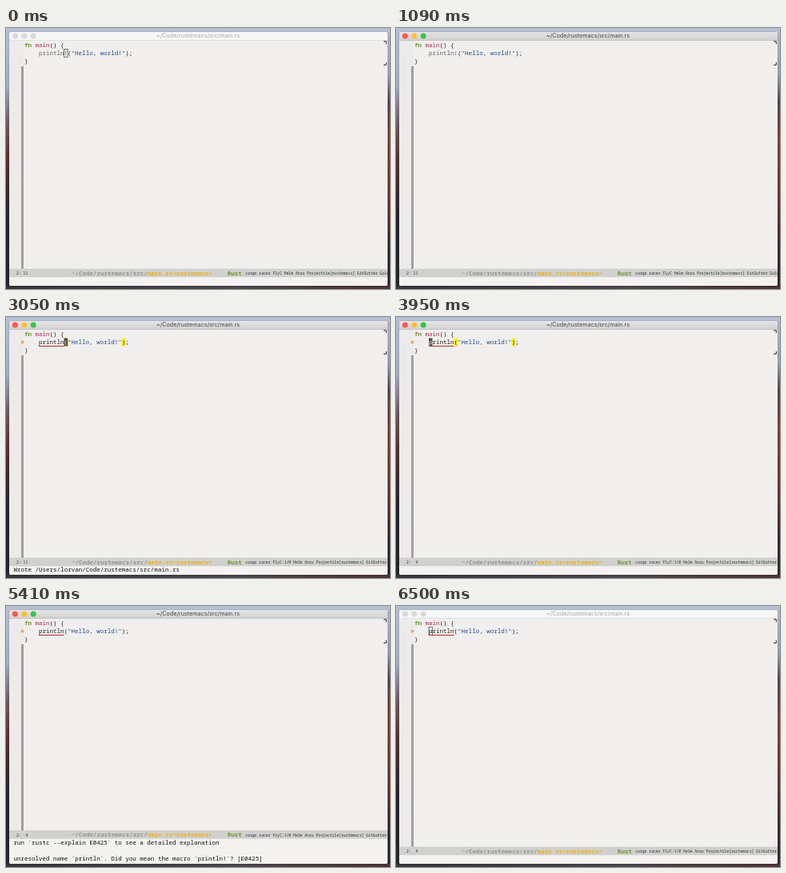
Write an HTML page that moves like this. It is 480 px wide and 327 px high and loops after 6550 ms.

```html
<!DOCTYPE html>
<html lang="en">
<head>
<meta charset="utf-8">
<title>Editor session</title>
<style>
  html, body { margin: 0; width: 100%; height: 100%; overflow: hidden; background: #2c2b38; }
  svg { display: block; width: 480px; height: 327px; }
  text { white-space: pre; font: 500 7.52px "Noto Sans Mono", "DejaVu Sans Mono", monospace; fill: #222; }
  .bold { font-weight: 700; }
  .small { font-size: 4.75px; fill: #2c2c2c; }
  .title { font: 7.2px Inter, "Open Sans", sans-serif; text-anchor: middle; }
  .key { font-weight: 700; fill: #6f962b; }
  .fn { fill: #a52a58; }
  .macro { fill: #666; }
  .str { fill: #234b8c; }
  .path { fill: #929292; }
  .file { fill: #e8b020; }
  .echo { fill: #111; }
</style>
</head>
<body>
<svg viewBox="0 0 480 327">
  <defs>
    <linearGradient id="sky" x2="0" y2="1">
      <stop offset="0" stop-color="#b4bfd3"/>
      <stop offset=".22" stop-color="#a3acc0"/>
      <stop offset=".36" stop-color="#6f5a64"/>
      <stop offset=".5" stop-color="#59302f"/>
      <stop offset=".72" stop-color="#23252f"/>
      <stop offset="1" stop-color="#25272d"/>
    </linearGradient>
    <linearGradient id="cliff" x2="0" y2="1">
      <stop offset="0" stop-color="#afbad0"/>
      <stop offset=".18" stop-color="#959fb3"/>
      <stop offset=".28" stop-color="#58474c"/>
      <stop offset=".42" stop-color="#8f3e33"/>
      <stop offset=".68" stop-color="#743029"/>
      <stop offset=".84" stop-color="#3a2a30"/>
      <stop offset="1" stop-color="#33282c"/>
    </linearGradient>
    <linearGradient id="ground">
      <stop offset="0" stop-color="#34373c"/>
      <stop offset=".6" stop-color="#4b474c"/>
      <stop offset="1" stop-color="#4a3434"/>
    </linearGradient>
    <linearGradient id="bar" x2="0" y2="1">
      <stop offset="0" stop-color="#e6e5e6"/>
      <stop offset="1" stop-color="#d1d0d1"/>
    </linearGradient>
    <clipPath id="frame"><rect x="4" y="5" width="473" height="318" rx="2.5"/></clipPath>
  </defs>

  <rect width="240" height="327" fill="url(#sky)"/>
  <rect x="240" width="240" height="327" fill="url(#cliff)"/>
  <rect width="480" height="5" fill="#b6c0d3"/>
  <rect y="323" width="480" height="4" fill="url(#ground)"/>
  <rect x="3.4" y="4.6" width="474.2" height="319.4" rx="3" fill="#000" opacity=".15"/>

  <g clip-path="url(#frame)">
    <rect x="4" y="5" width="473" height="318" fill="#f0efed"/>
    <rect x="4" y="15" width="18" height="308" fill="#ecebe9"/>
    <rect id="bar-fill" x="4" y="5" width="473" height="10.5"/>
    <rect id="bar-edge" x="4" y="15" width="473" height=".6"/>
    <circle class="light" cx="11.4" cy="9.9" r="3.5"/>
    <circle class="light" cx="22.8" cy="9.9" r="3.5"/>
    <circle class="light" cx="34.2" cy="9.9" r="3.5"/>
    <circle id="edited" cx="11.4" cy="9.9" r="1.2" fill="#7a1512"/>
    <text id="title" class="title" x="240" y="12.4">~/Code/rustemacs/src/main.rs</text>

    <g fill="none" stroke-width="3">
      <path d="M20.5 48V303" stroke="#b4b4b2"/>
      <path d="M20.5 48V303" stroke="#8c8c8a" stroke-dasharray="1.1 .9"/>
    </g>
    <path d="M472 16.8H475.3V20M475.3 43V46.3H472" fill="none" stroke="#222" stroke-width="1"/>

    <g id="parens" fill="#fbf21b">
      <rect x="72.6" y="26.5" width="5" height="10"/>
      <rect x="144.6" y="26.5" width="5" height="10"/>
    </g>
    <rect id="cursor" y="26.5" width="4.5" height="10"/>
    <text x="23" y="23.9"><tspan class="key">fn</tspan> <tspan class="fn">main</tspan>() {</text>
    <text id="macro-line" x="41" y="34.2"><tspan class="macro">println!</tspan>(<tspan class="str">"Hello, world!"</tspan>);</text>
    <text id="call-line" x="41" y="34.2"><tspan id="first">p</tspan>rintln<tspan id="open">(</tspan><tspan class="str">"Hello, world!"</tspan>);</text>
    <text x="23" y="44.3">}</text>
    <g id="error">
      <path d="M41 36.5H72.5" stroke="#b5282c" stroke-width="1"/>
      <text class="bold" x="17.9" y="34.2" style="fill:#e3932d;font-size:8.6px">»</text>
    </g>

    <g id="mode">
      <rect x="4" y="312" width="473" height="40" fill="#f3f2f0"/>
      <rect id="mode-bg" x="4" width="473" fill="#d0d0cf"/>
      <text id="pos" class="small" x="13" y="309.3"></text>
      <g id="flag">
        <rect x="37" y="299.7" width="19" height="11.6" fill="#fbfafa" stroke="#b8282e" stroke-width="1.2"/>
        <text class="bold" x="41.2" y="309.8" style="fill:#c0272d">**</text>
      </g>
      <g id="mode-text">
        <text class="bold" x="82" y="309.6"><tspan class="path">~/Code/rustemacs/src/</tspan><tspan class="file">main.rs&lt;rustemacs&gt;</tspan></text>
        <text class="key" x="276.7" y="309.6">Rust</text>
        <text id="minor" class="small" x="299.2" y="309.3"></text>
      </g>
    </g>
    <text id="echo-top" class="echo" x="9.5" y="298.8"></text>
    <text id="echo" class="echo" x="9.5" y="319"></text>
  </g>
</svg>
<script>
const LOOP = 6550;
const FOCUS = 560, ERASE = 1610, SAVE = 2590, CHECKED = 2900,
      MOVE = 3860, EXPLAIN = 4770, BLUR = 6200;
const PAREN_DELAY = 125, BLINK = 500;
const START_X = 41, CALL_END = 72.6;

const $ = id => document.getElementById(id);
const lights = [...document.querySelectorAll('.light')];
const show = (id, on) => $(id).setAttribute('visibility', on ? 'visible' : 'hidden');
const attrs = (el, map) => Object.entries(map).forEach(([k, v]) => el.setAttribute(k, v));
const write = (id, text) => { if ($(id).textContent !== text) $(id).textContent = text; };
const within = (t, from, to) => t >= from && t < to;

// The cursor blinks from the most recent key press or focus change.
function cursorOn(t) {
  const last = [MOVE, SAVE, ERASE, FOCUS].find(k => t >= k);
  return Math.floor((t - last) / BLINK) % 2 === 0;
}

function drawWindow(active) {
  attrs($('bar-fill'), { fill: active ? 'url(#bar)' : '#f6f6f6' });
  attrs($('bar-edge'), { fill: active ? '#b5b4b5' : '#d6d6d6' });
  $('title').style.fill = active ? '#444' : '#aaa';
  const colors = active ? ['#fc5652', '#fdbc38', '#33c748'] : ['#d9d9d9', '#d9d9d9', '#d9d9d9'];
  lights.forEach((el, i) => attrs(el, { fill: colors[i] }));
}

function drawCode(t, active) {
  const erased = t >= ERASE, moved = t >= MOVE;
  const solid = active && cursorOn(t);
  show('macro-line', !erased);
  show('call-line', erased);
  show('error', t >= CHECKED);
  show('parens', within(t, ERASE + PAREN_DELAY, MOVE + PAREN_DELAY));
  show('cursor', solid || !active);
  attrs($('cursor'), {
    x: moved ? START_X : CALL_END,
    fill: solid ? '#4a4a48' : 'none',
    stroke: active ? 'none' : '#555',
    'stroke-width': .8
  });
  $('first').style.fill = solid && moved ? '#f0efed' : '';
  $('open').style.fill = solid && erased && !moved ? '#f3eb3a' : '';
}

function drawModeLine(t) {
  const dirty = within(t, ERASE, SAVE);
  const tall = within(t, EXPLAIN, BLUR);
  const check = t < SAVE ? 'FlyC' : t < CHECKED ? 'FlyC*' : 'FlyC:1/0';
  show('flag', dirty);
  show('edited', dirty);
  attrs($('mode-bg'), { y: dirty ? 299 : 301.6, height: dirty ? 13 : 10.6 });
  attrs($('mode'), { transform: `translate(0 ${tall ? -20.6 : 0})` });
  attrs($('mode-text'), { transform: dirty ? 'translate(-6.8 -1)' : '' });
  attrs($('pos'), { y: dirty ? 308.3 : 309.3 });
  write('pos', t < MOVE ? '2: 11' : '2:  4');
  write('minor', `cargo racer ${check} Helm Anzu Projectile[rustemacs] GitGutter Golden`);
  write('echo-top', tall ? 'run `rustc --explain E0425` to see a detailed explanation' : '');
  write('echo', tall ? 'unresolved name `println`. Did you mean the macro `println!`? [E0425]'
    : within(t, SAVE, MOVE) ? 'Wrote /Users/lorvan/Code/rustemacs/src/main.rs' : '');
}

function draw() {
  const t = performance.now() % LOOP;
  const active = within(t, FOCUS, BLUR);
  drawWindow(active);
  drawCode(t, active);
  drawModeLine(t);
  requestAnimationFrame(draw);
}
draw();
</script>
</body>
</html>
```
